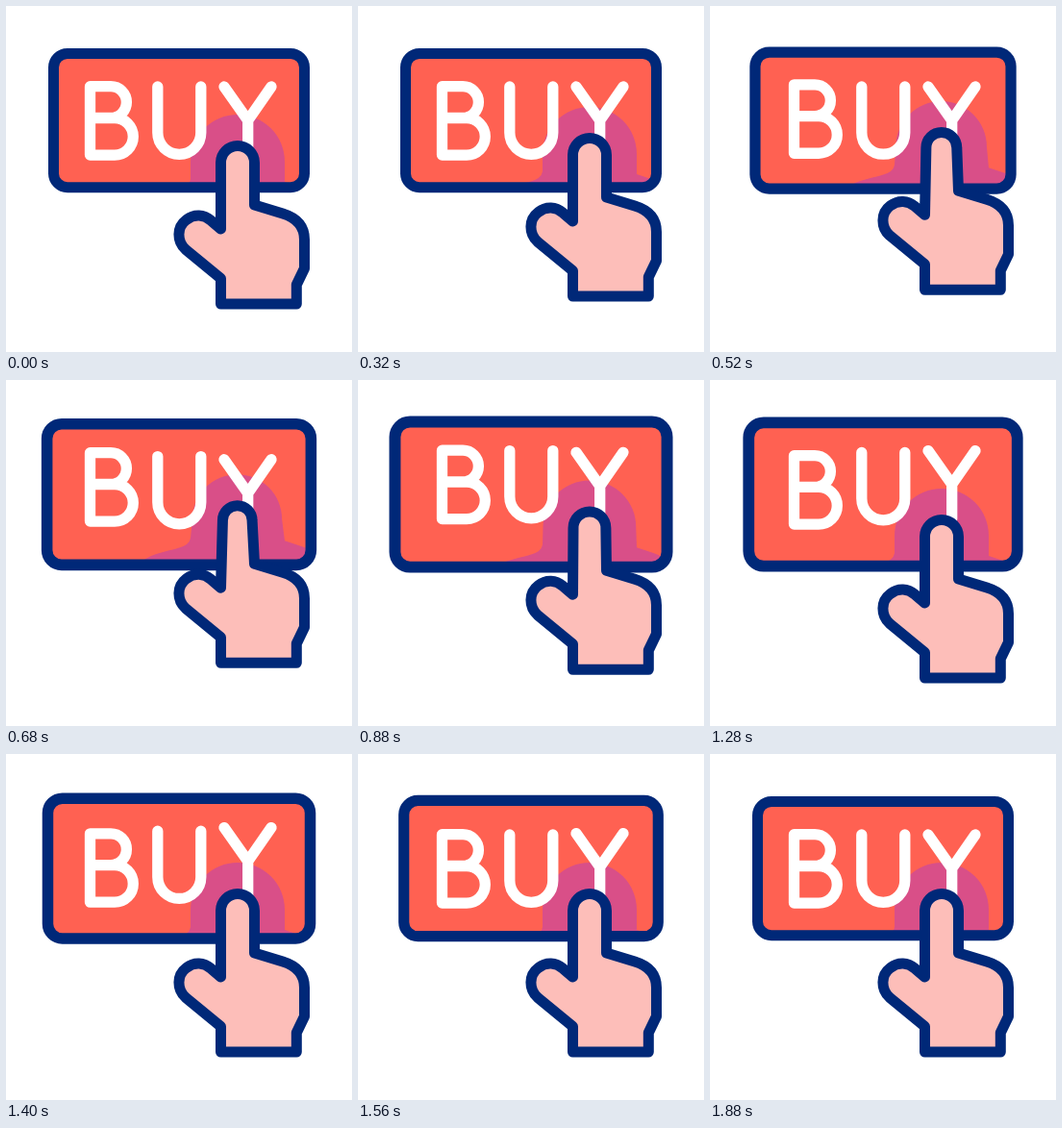
An HTML page for the animation above (1920 ms loop, 360x360 px).

```html
<!DOCTYPE html>
<html lang="en">
<head>
<meta charset="utf-8">
<title>Buy button</title>
<style>
  html, body { margin: 0; width: 100%; height: 100%; overflow: hidden; background: #fff; }
  svg { display: block; width: 100vw; height: 100vh; }
  .line { stroke: #002878; stroke-width: 11; stroke-linejoin: round; stroke-linecap: round; }
  .word { fill: none; stroke: #fff; stroke-width: 11.3; stroke-linejoin: round; stroke-linecap: round; }
</style>
</head>
<body>
<svg viewBox="0 0 360 360" role="img" aria-label="BUY">
  <defs>
    <clipPath id="face"><rect class="button" x="49.5" y="49.4" width="261" height="139.3" rx="14.5"/></clipPath>
  </defs>
  <rect class="button" x="49.5" y="49.4" width="261" height="139.3" rx="14.5" fill="#ff6152"/>
  <g clip-path="url(#face)">
    <path id="shade" class="hand" fill="#d94f88"/>
  </g>
  <g class="word">
    <path class="letter" d="M87.5 83.7 H109 A16.4 16.4 0 0 1 109 116.5 H87.5 M109 116.5 H113 A19.3 19.3 0 0 1 113 155.1 H87.5 V83.7"/>
    <path class="letter" d="M157.8 84 V131.8 A22.5 22.5 0 0 0 202.8 131.8 V84"/>
    <path class="letter" d="M227 84 L251.7 119 L276 84 M251.7 119 V155"/>
  </g>
  <rect class="button line" x="49.5" y="49.4" width="261" height="139.3" rx="14.5" fill="none"/>
  <path id="hand" class="hand line" fill="#fdbeb9"/>
</svg>
<script>
const LOOP = 1920, STEP = 40;
const all = name => [...document.querySelectorAll(name)];
const buttons = all('.button'), hands = all('.hand'), letters = all('.letter');
const shade = document.getElementById('shade'), hand = document.getElementById('hand');

// Sine ease from 0 to 1 between two times.
function ease(t, from, to) {
  const p = Math.min(1, Math.max(0, (t - from) / (to - from)));
  return (1 - Math.cos(Math.PI * p)) / 2;
}

// A round fingertip between two x positions.
const tip = (left, right, y) => {
  const r = (right - left) / 2;
  return `L${left} ${y} A${r} ${r} 0 0 1 ${right} ${y}`;
};

const handPath = pinch => `M223.5 232 ${tip(223.5 + 2 * pinch, 258.5 - 2.5 * pinch, 163 - 1.3 * pinch)}
  L258.5 207 L288 216 Q310.5 223 310.5 243 V273 L302.3 290 V310 H223.5 V283.5
  L187 253.5 C177.5 245 177.5 230 187.5 222.6 C196 216 206 217 213 223 Z`;

const shadePath = pinch => `M130 212 L145 202 C153 197 166 194 178 191 Q191 188 192 180
  ${tip(192 + 2 * pinch, 290 - 3 * pinch, 162 - 1.5 * pinch)}
  L290 183 L308 189 L318 193 V215 H130 Z`;

const shift = (el, y) => el.setAttribute('transform', `translate(0 ${y.toFixed(3)})`);

function draw(t) {
  const lift = -16 * (ease(t, 0, 640) - ease(t, 640, 1150));
  hands.forEach(el => shift(el, lift));

  // The fingertip narrows near the top of its travel.
  const pinch = ease(t, 320, 640) - ease(t, 640, 1000);
  hand.setAttribute('d', handPath(pinch));
  shade.setAttribute('d', shadePath(pinch));

  const scale = 1 + 0.088 * (ease(t, 320, 960) - ease(t, 1100, 1720));
  buttons.forEach(el => el.setAttribute('transform',
    `translate(180 119) scale(${scale.toFixed(4)}) translate(-180 -119)`));

  letters.forEach((el, i) => {
    const delay = i * 90;
    shift(el, -10.5 * (ease(t, 410 + delay, 810 + delay) - ease(t, 1075 + delay, 1475 + delay)));
  });
}

const start = performance.now();
function tick() {
  const t = (performance.now() - start) % LOOP;
  draw(Math.floor(t / STEP) * STEP);
  requestAnimationFrame(tick);
}
tick();
</script>
</body>
</html>
```
